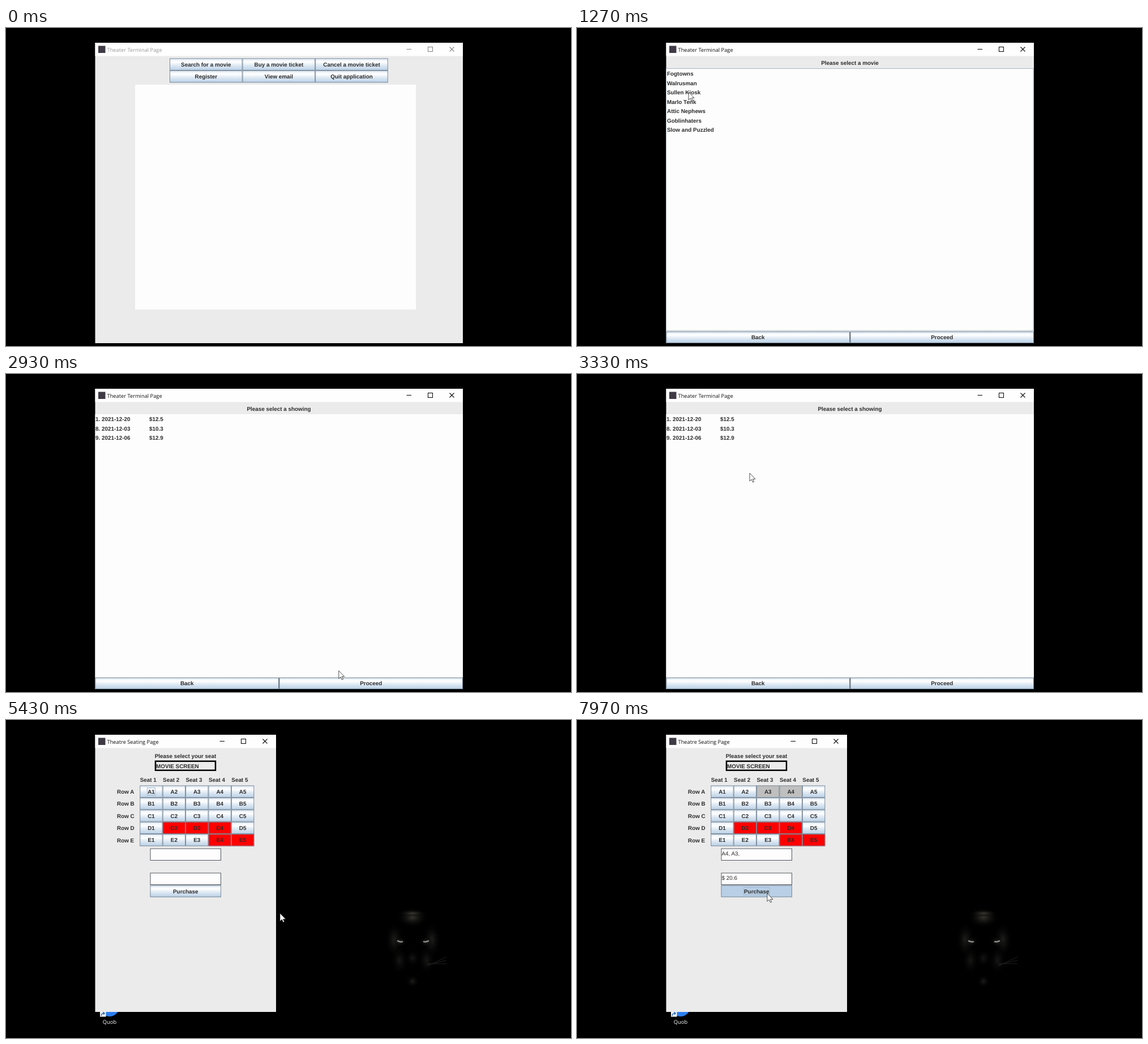
An HTML page with a canvas that plays this animation: 998x561 px, repeating every 8 s.

```html
<!DOCTYPE html>
<html lang="en">
<head>
<meta charset="utf-8">
<title>Theater terminal</title>
<style>
  html, body { margin: 0; width: 100%; height: 100%; overflow: hidden; background: #000; }
  canvas { display: block; }
</style>
</head>
<body>
<canvas id="stage" width="998" height="561"></canvas>
<script>
const ctx = document.getElementById('stage').getContext('2d');
const LOOP = 8000;
const BOLD = 'bold 9.9px "Liberation Sans", Arial, sans-serif';
const PLAIN = '9.9px "Liberation Sans", Arial, sans-serif';
const SYSTEM = '9.3px "Open Sans", "Noto Sans", sans-serif';
const PANEL = '#ebebeb', PAPER = '#fdfdfd', PICKED = '#b8cfe5', EDGE = '#7a8a99', INK = '#2d2d2d';

const MENU = ['Search for a movie', 'Buy a movie ticket', 'Cancel a movie ticket',
  'Register', 'View email', 'Quit application'];
const MOVIES = ['Fogtowns', 'Walrusman', 'Sullen Kiosk', 'Marlo Tenk',
  'Attic Nephews', 'Goblinhaters', 'Slow and Puzzled'];
const SHOWINGS = [['1. 2021-12-20', '$12.5'], ['8. 2021-12-03', '$10.3'], ['9. 2021-12-06', '$12.9']];
const SOLD = ['D2', 'D3', 'D4', 'E4', 'E5'];

// Times of clicks and page changes, in ms
const T = {
  menuActive: 30, buy: 780, movies: 1000, pickMovie: 1520, proceedMovie: 2600, showings: 2850,
  pickShowing: 3850, proceedShowing: 4880, seats: 5100, seatA4: 7130, seatA3: 7440, purchase: 7870
};

// Pointer stops: time, x, y
const POINTER = [
  [0, 560, 572], [150, 560, 572], [700, 480, 68], [960, 480, 68], [1270, 197, 113],
  [1480, 188, 77], [1750, 188, 77], [2450, 611, 552], [2850, 611, 552], [3330, 305, 175],
  [3780, 215, 95], [4100, 215, 95], [4800, 618, 549], [5080, 618, 549], [5430, 484, 341],
  [5830, 440, 318], [6700, 398, 300], [7080, 374, 121], [7200, 374, 121], [7400, 337, 121],
  [7540, 337, 121], [7840, 336, 306], [LOOP, 336, 306]
];

function fill(x, y, w, h, color) {
  ctx.fillStyle = color;
  ctx.fillRect(x, y, w, h);
}

function frame(x, y, w, h, color, width = 1) {
  ctx.strokeStyle = color;
  ctx.lineWidth = width;
  ctx.strokeRect(x, y, w, h);
}

function line(color, width, ...points) {
  ctx.strokeStyle = color;
  ctx.lineWidth = width;
  ctx.beginPath();
  points.forEach(([x, y]) => ctx.lineTo(x, y));
  ctx.stroke();
}

// y is the vertical middle of the capitals
function text(label, x, y, { font = BOLD, color = INK, align = 'left' } = {}) {
  ctx.font = font;
  ctx.fillStyle = color;
  ctx.textAlign = align;
  ctx.fillText(label, x, y + 3.5);
}

function button(label, x, y, w, h, { color, focus } = {}) {
  const shade = ctx.createLinearGradient(0, y, 0, y + h);
  [[0, '#dde8f3'], [.3, '#fff'], [.6, '#dde8f3'], [1, PICKED]].forEach(s => shade.addColorStop(...s));
  fill(x, y, w, h, color || shade);
  frame(x + .5, y + .5, w - 1, h - 1, EDGE);
  const cx = x + w / 2, cy = y + h / 2;
  text(label, cx, cy, { align: 'center' });
  if (focus) {
    const half = ctx.measureText(label).width / 2;
    frame(cx - half - .5, cy - 6.5, half * 2 + 1, 13, '#9fb6cc');
  }
}

function appWindow(title, right, bottom, state) {
  const x = 157.5, y = 26;
  fill(x, y, right - x, bottom - y, PANEL);
  fill(x, y, right - x, 23.5, '#fefefe');
  fill(163, 31.5, 12.5, 12.5, '#3f3a44');
  text(title, 178.5, 38, { font: SYSTEM, color: state === 'active' ? '#111' : '#999' });
  if (state === 'inactive') return;
  const color = state === 'active' ? '#111' : '#888';
  line(color, 1.1, [right - 99.5, 37.5], [right - 91, 37.5]);
  frame(right - 61.5, 33.5, 8, 8, color, 1.1);
  line(color, 1.1, [right - 23.5, 33.5], [right - 15.5, 41.5]);
  line(color, 1.1, [right - 15.5, 33.5], [right - 23.5, 41.5]);
}

function blob(x, y, rx, ry, color) {
  ctx.save();
  ctx.translate(x, y);
  ctx.scale(rx, ry);
  const glow = ctx.createRadialGradient(0, 0, 0, 0, 0, 1);
  glow.addColorStop(0, color);
  glow.addColorStop(1, 'rgba(0,0,0,0)');
  ctx.fillStyle = glow;
  ctx.fillRect(-1, -1, 2, 2);
  ctx.restore();
}

function desktop() {
  fill(0, 0, 998, 561, '#000');
  blob(718, 348, 28, 19, '#35342d');
  blob(718, 341, 24, 6, '#3c3b34');
  for (const side of [-1, 1]) {
    blob(719 + side * 33, 388, 17, 32, '#20201e');
    blob(719 + side * 24, 424, 16, 26, '#171716');
    blob(719 + side * 23, 391, 13, 9, '#2a2a28');
    line('#9b9b98', 2.2, [719 + side * 28, 389.5], [719 + side * 22, 391.5], [719 + side * 18, 391]);
  }
  blob(718, 420, 14, 16, '#151515');
  blob(718, 461, 12, 12, '#1d1d1c');
  for (let i = 0; i < 3; i++) line('#1f1f1e', 1, [744, 434 - i * 2], [778, 418 + i * 6]);

  ctx.fillStyle = '#2d7ff0';
  ctx.beginPath();
  ctx.arc(183, 506, 17, 0, 7);
  ctx.fill();
  fill(166, 513.5, 10.5, 10, '#f4f4f4');
  line('#2767b5', 1.4, [168, 522], [169, 518.5], [174, 517]);
  line('#2767b5', 1.4, [171, 515.5], [174, 517], [172.5, 520]);
  text('Quob', 183, 532.5, { font: SYSTEM, color: '#fff', align: 'center' });
}

function menuPage(t) {
  appWindow('Theater Terminal Page', 807, 556,
    t < T.menuActive ? 'opening' : t < T.buy + 90 ? 'active' : 'inactive');
  MENU.forEach((label, i) => {
    const pressed = i === 1 && t >= T.buy;
    button(label, 289 + (i % 3) * 128.6, 53.5 + Math.floor(i / 3) * 21.4, 128.6, 21.4,
      { color: pressed && PICKED, focus: pressed });
  });
  fill(228, 100, 496, 396.5, PAPER);
}

function listPage(heading, pressed) {
  appWindow('Theater Terminal Page', 807, 556, pressed ? 'inactive' : 'active');
  text(heading, 482, 61, { align: 'center' });
  fill(157.5, 71, 649.5, 464, PAPER);
  button('Back', 157.5, 535.5, 324.5, 20.5);
  button('Proceed', 482.5, 535.5, 324.5, 20.5, { color: pressed && PICKED, focus: pressed });
  line('#68727d', 1, [482.5, 536], [482.5, 556]);
}

function moviesPage(t) {
  listPage('Please select a movie', t >= T.proceedMovie);
  frame(157.5, 71.5, 648.5, 462.5, '#a9b4bf');
  if (t >= T.pickMovie) fill(158, 71.5, 647.5, 16.5, PICKED);
  MOVIES.forEach((name, i) => text(name, 159, 80.5 + i * 16.5));
}

function showingsPage(t) {
  listPage('Please select a showing', t >= T.proceedShowing);
  if (t >= T.pickShowing) fill(157.5, 87.5, 649.5, 16.5, PICKED);
  SHOWINGS.forEach(([date, price], i) => {
    text(date, 158, 79.8 + i * 16.5);
    text(price, 253, 79.8 + i * 16.5);
  });
}

function field(y, value) {
  fill(254.5, y, 125.5, 21.5, PAPER);
  frame(255, y + .5, 124.5, 20.5, '#50545a');
  text(value, 255.5, y + 8.5, { font: PLAIN });
}

function seatsPage(t) {
  appWindow('Theatre Seating Page', 477, 515, 'active');
  text('Please select your seat', 317, 63.3, { align: 'center' });
  frame(264, 72.7, 106, 16, '#000', 2.5);
  text('MOVIE SCREEN', 265, 81.3);

  const chosen = [];
  if (t >= T.seatA4) chosen.push('A4');
  if (t >= T.seatA3) chosen.push('A3');
  const buying = t >= T.purchase;
  const focused = buying ? 'Purchase' : chosen[chosen.length - 1] || 'A1';

  for (let row = 0; row < 5; row++) {
    const letter = 'ABCDE'[row], y = 115.5 + row * 21.4;
    text('Seat ' + (row + 1), 236.7 + row * 40.4, 105.3);
    text('Row ' + letter, 196, y + 11);
    for (let col = 0; col < 5; col++) {
      const seat = letter + (col + 1);
      const color = SOLD.includes(seat) ? '#ff0000' : chosen.includes(seat) ? '#bfbfbf' : null;
      button(seat, 236.3 + col * 40.4, y, 40.4, 21.4, { color, focus: seat === focused });
    }
  }
  field(226.5, chosen.map(seat => seat + ', ').join(''));
  field(269.5, chosen.length ? '$ ' + (chosen.length * 10.3).toFixed(1) : '');
  button('Purchase', 254.5, 291.5, 125.5, 21, { color: buying && PICKED, focus: buying });
}

function pointer(t) {
  const next = Math.max(1, POINTER.findIndex(stop => stop[0] > t));
  const [t0, x0, y0] = POINTER[next - 1], [t1, x1, y1] = POINTER[next];
  const k = (t - t0) / (t1 - t0), ease = k * k * (3 - 2 * k);
  ctx.save();
  ctx.translate(x0 + (x1 - x0) * ease, y0 + (y1 - y0) * ease);
  const arrow = new Path2D('M0 0V14L3.3 11L5.6 16L7.7 15L5.5 10.3H10Z');
  ctx.fillStyle = '#fff';
  ctx.fill(arrow);
  ctx.strokeStyle = '#222';
  ctx.lineWidth = .8;
  ctx.stroke(arrow);
  ctx.restore();
}

function draw(now) {
  const t = now % LOOP;
  desktop();
  if (t < T.movies) menuPage(t);
  else if (t < T.showings) moviesPage(t);
  else if (t < T.seats) showingsPage(t);
  else seatsPage(t);
  pointer(t);
}

ctx.textRendering = 'geometricPrecision';
const start = performance.now();
function tick() {
  draw(performance.now() - start);
  requestAnimationFrame(tick);
}
tick();
</script>
</body>
</html>
```
